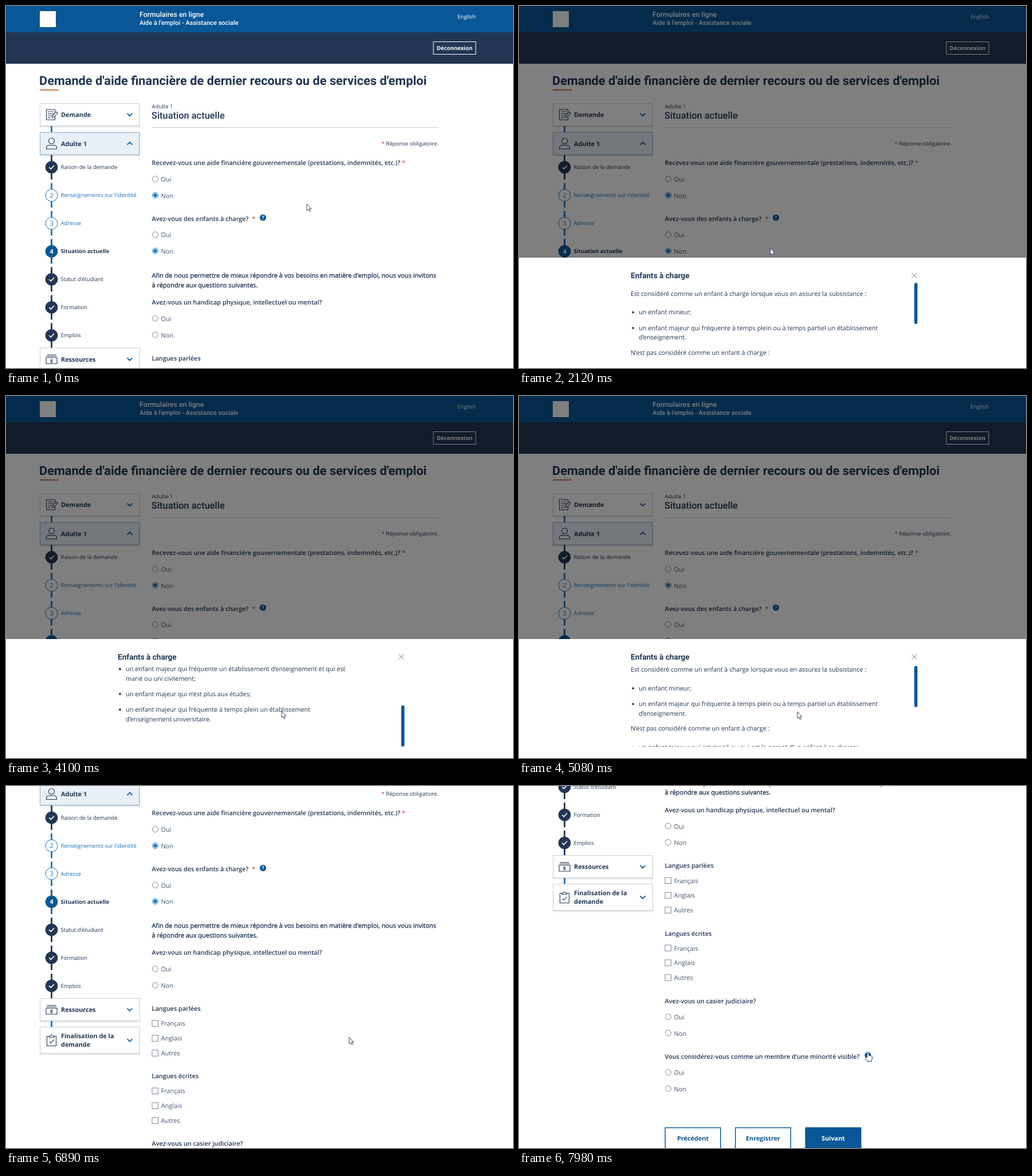
Recreate the animation shown at these times as an HTML page. Size 885 px wide and 633 px high, loop 8000 ms.

```html
<!DOCTYPE html>
<html lang="fr">
<head>
<meta charset="utf-8">
<title>Formulaire en ligne</title>
<style>
html, body { margin: 0; width: 100%; height: 100%; overflow: hidden; background: #fff; }
svg { display: block; width: 885px; height: 633px; }
text { font: 400 10.9px "Open Sans", sans-serif; fill: #223654; white-space: pre; text-rendering: geometricPrecision; }
.semi { font-weight: 600; }
.bold { font-weight: 700; }
.small { font-size: 9.6px; }
.opt { font-size: 11px; fill: #44546d; }
.faux { font-size: 10.97px; stroke: #223654; stroke-width: .35px; }
.title { font: 700 21.76px Roboto, sans-serif; }
.sub { font: 500 16.4px Roboto, sans-serif; }
.head { font: 700 13.6px Roboto, sans-serif; }
.brand { font: 500 12.35px Roboto, sans-serif; fill: #fff; }
.brand2 { font: 500 10.98px Roboto, sans-serif; fill: #fff; }
.white { fill: #fff; }
.link { fill: #1472bf; }
.blue { fill: #095797; }
.star { fill: #c4622d; font-weight: 600; }
.mid { text-anchor: middle; }
.end { text-anchor: end; }
.icon { fill: none; stroke: #223654; stroke-width: 1.1; stroke-linejoin: round; stroke-linecap: round; }
</style>
</head>
<body>
<svg id="stage" viewBox="0 0 885 633"></svg>
<script>
const NAVY = '#223654', BLUE = '#095797', LINK = '#1472bf', GREY = '#7b8698';

const text = (x, y, s, cls = '') => `<text x="${x}" y="${y}" class="${cls}">${s}</text>`;
const rect = (x, y, w, h, fill, more = '') =>
  `<rect x="${x}" y="${y}" width="${w}" height="${h}" fill="${fill}" ${more}/>`;
const circle = (x, y, r, fill, stroke = 'none') =>
  `<circle cx="${x}" cy="${y}" r="${r}" fill="${fill}" stroke="${stroke}"/>`;
const line = (d, stroke, width = 1) =>
  `<path d="${d}" fill="none" stroke="${stroke}" stroke-width="${width}"/>`;

// Form parts; y is the visual middle of the row
const radio = (y, label, on) =>
  circle(260.5, y - .5, 5, '#fff', on ? LINK : GREY) +
  (on ? circle(260.5, y - .5, 3.2, LINK) : '') + text(270.5, y + 4, label, 'opt');
const yesNo = (y, no) => radio(y, 'Oui') + radio(y + 28.5, 'Non', no);
const boxes = y => ['Français', 'Anglais', 'Autres'].map((s, i) => {
  const m = y + i * 25.9;
  return rect(255, m - 5.5, 10.5, 10.5, '#fff', `stroke="${GREY}"`) + text(270.5, m + 4, s, 'opt');
}).join('');
const question = (y, s) => text(254.5, y + 4, s, 'semi');
const help = (x, y) => circle(x, y, 5.6, BLUE) +
  `<text x="${x}" y="${y + 3}" class="bold white mid" style="font-size:8.5px">?</text>`;
const button = (x, s, full) =>
  rect(x + .7, 1074, 96.6, 37, full ? BLUE : '#fff', `stroke="${BLUE}" stroke-width="1.5"`) +
  text(x + 49, 1096, s, 'bold mid ' + (full ? 'white' : 'blue'));

// Side menu
const card = (y, h, lines, icon, open) => {
  const m = y + h / 2, d = open ? -2.2 : 2.2;
  return rect(59, y + 1.5, 175, h + 1, '#000', 'opacity=".09"') +
    rect(59.5, y + .5, 173.5, h - 1, open ? '#e9f0f7' : '#fff', `stroke="${open ? '#86abcd' : '#c8cdd5'}"`) +
    lines.map((s, i) => text(96, m + 4 + (i - (lines.length - 1) / 2) * 14.2, s, 'bold')).join('') +
    line(`M211.5 ${m - d}L216 ${m + d}L220.5 ${m - d}`, BLUE, 1.7) +
    `<g class="icon" transform="translate(79.5 ${m})">${icon}</g>`;
};
const step = (label, i) => {
  const y = 282 + i * 49, link = i === 1 || i === 2, now = i === 3;
  const color = link ? LINK : now ? BLUE : NAVY;
  return line(`M79.5 ${y - 21.5}V${y + (i === 6 ? 23 : 21.5)}`, color, 2.8) +
    circle(79.5, y, 10.5, link ? '#fff' : color, color) +
    (link || now
      ? text(79.5, y + 4, i + 1, 'mid ' + (now ? 'bold white' : 'link'))
      : line(`M75.3 ${y}L78.3 ${y + 3}L84 ${y - 3}`, '#fff', 1.7)) +
    text(95.5, y + 3.2, label, 'small ' + (now ? 'bold' : link ? 'link' : ''));
};
const docIcon = '<path d="M6 3V9H-9V-9H6V-5M-6 -5H3M-6 -1.5H3M-6 2H0M-6 5.5H-2M1 5L2 1L8 -5L10.500 -2.500L4.500 4Z"/>';
const userIcon = '<circle cy="-4.500" r="5"/><path d="M-9 9.500V7.500Q-9 3 -4 3H4Q9 3 9 7.500V9.500Z"/>';
const cashIcon = '<path d="M-7.500 -7.500H7.500M-8.500 -5H8.500M-9.500 -2.500H9.500V8H-9.500Z"/>' +
  '<text y="6" class="bold mid" stroke="none" style="font-size:8.5px">$</text>';
const clipIcon = '<path d="M-4 -7H-8V10H8V-7H4M-4 -5V-7.500H-2Q0 -12 2 -7.500H4V-5ZM-3.500 2.500L-1 5L4 -.500"/>';

const page =
  rect(0, 0, 885, 101, NAVY) + rect(0, 0, 885, 46, BLUE) +
  rect(59, 9, 28, 28, '#fff') +
  text(233, 19, 'Formulaires en ligne', 'brand') +
  text(233, 32.7, "Aide à l'emploi - Assistance sociale", 'brand2') +
  text(788, 21.5, 'English', 'small white') +
  rect(746, 62.5, 74, 22, 'none', 'stroke="#fff"') + text(783, 77, 'Déconnexion', 'small bold white mid') +
  text(58, 137.7, "Demande d'aide financière de dernier recours ou de services d'emploi", 'title') +
  rect(59, 145.5, 33, 2.5, '#d98a60') +
  line('M79.5 209V222M79.5 636V649', LINK, 2.8) +
  ['Raison de la demande', "Renseignements sur l'identité", 'Adresse', 'Situation actuelle',
    "Statut d'étudiant", 'Formation', 'Emplois'].map(step).join('') +
  card(170, 40, ['Demande'], docIcon) +
  card(220.5, 40, ['Adulte 1'], userIcon, true) +
  card(597.5, 40, ['Ressources'], cashIcon) +
  card(647.5, 47, ['Finalisation de la', 'demande'], clipIcon) +
  text(254.5, 179, 'Adulte 1', 'small') + text(254, 197, 'Situation actuelle', 'sub') +
  line('M254.5 212.5H755', '#c5cad2') +
  text(755, 243.5, '<tspan class="star">*</tspan> Réponse obligatoire.', 'small end') +
  question(274, 'Recevez-vous une aide financière gouvernementale (prestations, indemnités, etc.)? <tspan class="star">*</tspan>') +
  yesNo(303, true) +
  question(371.5, 'Avez-vous des enfants à charge?') + text(429.5, 375.5, '*', 'star') + help(448.5, 370) +
  yesNo(400.3, true) +
  text(254.5, 475, "Afin de nous permettre de mieux répondre à vos besoins en matière d'emploi, nous vous invitons", 'faux') +
  text(254.5, 491.5, 'à répondre aux questions suivantes.', 'faux') +
  question(518, 'Avez-vous un handicap physique, intellectuel ou mental?') + yesNo(547, false) +
  question(615.5, 'Langues parlées') + boxes(642) +
  question(734, 'Langues écrites') + boxes(760) +
  question(852, 'Avez-vous un casier judiciaire?') + yesNo(880.5, false) +
  question(949, "Vous considérez-vous comme un membre d'une minorité visible?") + help(609, 947.5) +
  yesNo(977.7, false) +
  button(254.5, 'Précédent') + button(377, 'Enregistrer') + button(499.5, 'Suivant', true);

const para = (y, s) => text(195, y + 4, s);
const item = (y, s, next) => circle(199, y + .5, 1.9, NAVY) + text(209, y + 4, s) +
  (next ? text(209, y + 20.5, next) : '');
const notes =
  para(487.5, 'Est considéré comme un enfant à charge lorsque vous en assurez la subsistance :') +
  item(520, 'un enfant mineur;') +
  item(547.5, 'un enfant majeur qui fréquente à temps plein ou à temps partiel un établissement', 'd’enseignement.') +
  para(590.7, 'N’est pas considéré comme un enfant à charge :') +
  item(623.5, 'un enfant mineur qui est marié ou qui est le parent d’un enfant à sa charge;') +
  item(650.7, 'un enfant mineur pleinement émancipé;') +
  item(678, 'un enfant majeur qui est marié ou qui est le parent d’un enfant à sa charge;') +
  item(705, 'un enfant majeur qui fréquente un établissement d’enseignement et qui est', 'marié ou uni civilement;') +
  item(748.5, 'un enfant majeur qui n’est plus aux études;') +
  item(776, 'un enfant majeur qui fréquente à temps plein un établissement', 'd’enseignement universitaire.');

document.getElementById('stage').innerHTML = `
  <clipPath id="view"><rect x="190" y="469" width="495" height="144"/></clipPath>
  <g id="page">${page}</g>
  <rect id="shade" width="885" height="633"/>
  <g id="panel">
    ${rect(0, 425, 885, 210, '#fff')}
    ${text(195, 461, 'Enfants à charge', 'head')}
    ${line('M685.5 451.5L694.5 460.5M694.5 451.5L685.5 460.5', GREY)}
    <g clip-path="url(#view)"><g id="notes">${notes}</g></g>
    <rect id="bar" x="690" width="5.5" height="72" rx="2.5" fill="${BLUE}"/>
  </g>
  <g id="cursor" stroke="${NAVY}" fill="#fff" stroke-linejoin="round">
    <path id="arrow" stroke-width=".9" d="M0 0V11.500L2.600 9.200L4.400 13.200L6.200 12.400L4.400 8.600H8Z"/>
    <path id="hand" d="M-1.300 1.300Q0 -.500 1.300 1.300V6L3.500 6.200L5.500 6.800Q7.500 7 7.500 9V12Q6 14.500 6 16.500H-1Q-1.500 14.500 -3 12.500L-4.500 9.500Q-4.500 8 -3 8.500L-1.300 10Z"/>
  </g>`;

// Keys are [time, ...values]
const smooth = p => p * p * (3 - 2 * p);
const linear = p => p;
function at(keys, t, ease = linear) {
  const i = keys.findIndex(k => k[0] > t);
  if (i === 0) return keys[0].slice(1);
  if (i < 0) return keys[keys.length - 1].slice(1);
  const a = keys[i - 1], b = keys[i], p = ease((t - a[0]) / (b[0] - a[0]));
  return a.slice(1).map((v, n) => v + (b[n + 1] - v) * p);
}
const pageScroll = [[6530, 0], [6890, 226], [7310, 450], [7350, 453], [7440, 476.5]];
const notesDown = [[3110, 0], [3360, 57], [3880, 205], [3980, 205], [4100, 228]];
const slide = [[1720, 208], [2200, 0], [5780, 0], [6090, 208]];
const shade = [[1610, 0], [1700, .5], [6110, .5], [6200, 0]];
const pointer = [
  [550, 525, 346], [960, 452, 367], [1740, 452, 367], [2400, 430, 459], [2430, 430, 459],
  [2880, 491, 527], [3110, 491, 527], [3360, 481, 551], [4460, 481, 551], [5080, 486, 552],
  [5290, 486, 552], [5620, 690, 457], [5960, 690, 457], [6270, 625, 442.5], [6360, 599, 439.5],
  [7640, 599, 439.5], [7960, 609, 465]
];
const hovers = [[900, 1640], [5590, 5820], [7860, 8000]];

const $ = id => document.getElementById(id);
const move = (id, x, y) => $(id).setAttribute('transform', `translate(${x} ${y})`);

function draw() {
  const t = performance.now() % 8000;
  const back = Math.min(1, Math.max(0, (t - 4460) / 800));
  const scroll = at(notesDown, t)[0] * (1 - back) ** 2.13;
  move('page', 0, -at(pageScroll, t)[0]);
  move('panel', 0, at(slide, t, smooth)[0]);
  move('notes', 0, -scroll);
  $('bar').setAttribute('y', 469 + scroll * 72 / 228);
  $('shade').setAttribute('opacity', at(shade, t)[0]);
  move('cursor', ...at(pointer, t, smooth));
  const hover = hovers.some(([a, b]) => t >= a && t < b);
  $('hand').style.display = hover ? '' : 'none';
  $('arrow').style.display = hover ? 'none' : '';
  requestAnimationFrame(draw);
}
draw();
</script>
</body>
</html>
```
